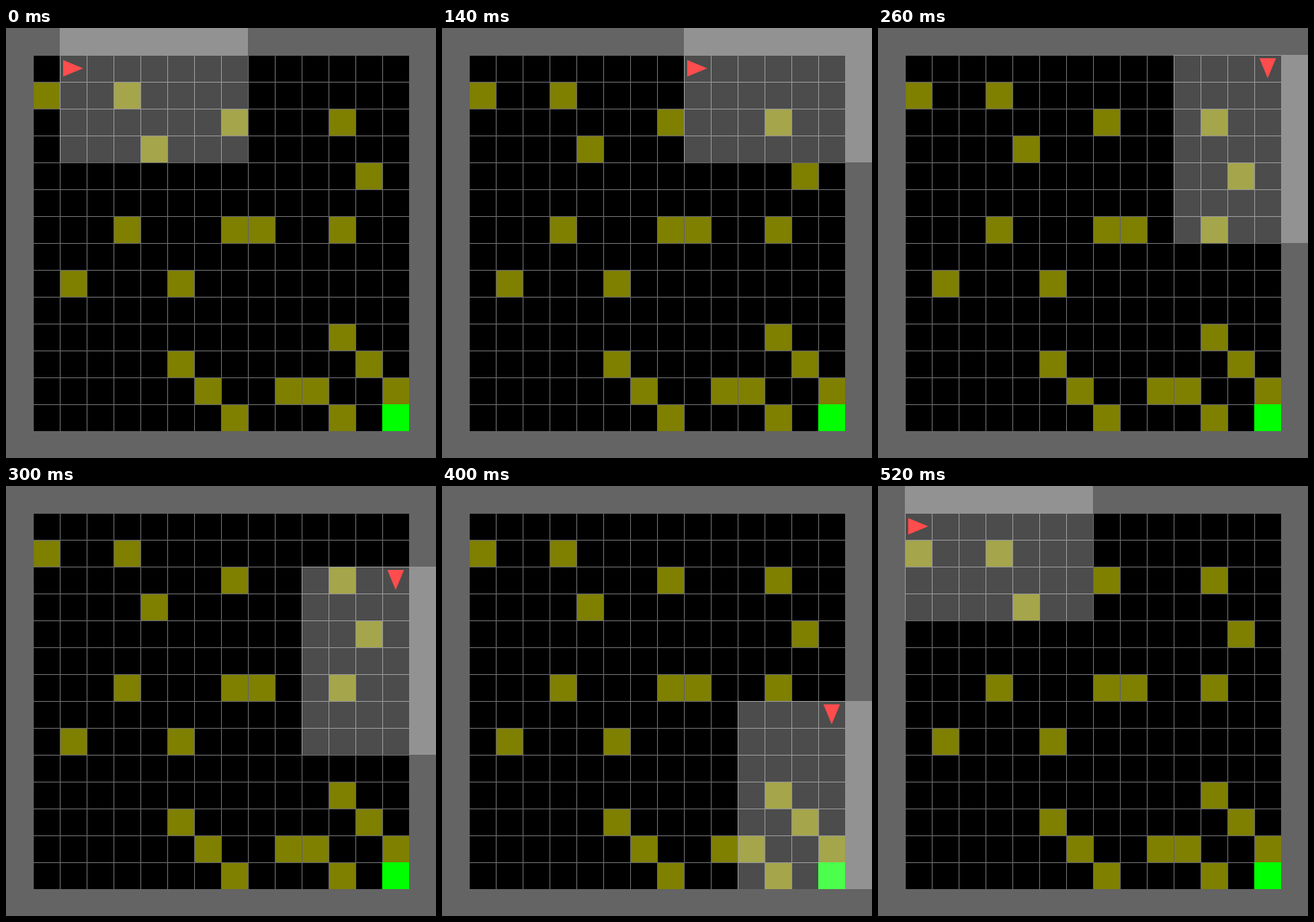
An HTML page with a canvas for the animation above (0.54 s loop, 512 px wide and 512 px high).

```html
<!DOCTYPE html>
<html>
<head>
<meta charset="utf-8">
<style>
html, body { margin: 0; height: 100%; overflow: hidden; background: #646464; }
canvas { display: block; }
</style>
</head>
<body>
<canvas id="stage" width="512" height="512"></canvas>
<script>
const ctx = document.getElementById('stage').getContext('2d');
const TILE = 32, LAST = 14, VIEW = 7, STEP_MS = 20, STEPS = 27;

function fillTile(col, row, color, inset = 0) {
  ctx.fillStyle = color;
  ctx.fillRect(col * TILE + inset, row * TILE + inset, TILE - inset, TILE - inset);
}

function drawFloor(col, row) {
  fillTile(col, row, '#7f7f00', 1);
}

// The floor tiles lie on short, evenly spaced lines.
function drawFloors() {
  for (let i = 0; i < 3; i++) {
    drawFloor(4 + 4 * i, 7);
    drawFloor(12 + i, 11 + i);
    drawFloor(6 + i, 12 + i);
  }
  for (let i = 0; i < 2; i++) {
    drawFloor(1 + 11 * i, 2 + 12 * i);
    drawFloor(4 + i, 2 + 2 * i);
    drawFloor(12 + i, 3 + 2 * i);
    drawFloor(8 + i, 3 + 4 * i);
    drawFloor(2 + 4 * i, 9);
    drawFloor(10 + i, 13);
  }
}

function drawRoom() {
  ctx.fillStyle = '#646464';
  ctx.fillRect(0, 0, 512, 512);
  for (let row = 1; row <= LAST; row++)
    for (let col = 1; col <= LAST; col++) fillTile(col, row, '#000', 1);
  drawFloors();
  fillTile(LAST, LAST, '#0f0');
}

function insideArrow(along, across) {
  const halfWidth = 0.31 * (0.87 - along) / 0.75;
  return along >= 0.12 && Math.abs(across - 0.5) <= halfWidth;
}

// Share of a 3 by 3 sample grid in one pixel that the arrow covers.
function arrowCoverage(x, y) {
  let hits = 0;
  for (let i = 0; i < 9; i++) {
    const along = (x + (i % 3 + 0.5) / 3) / TILE;
    const across = (y + (Math.floor(i / 3) + 0.5) / 3) / TILE;
    if (insideArrow(along, across)) hits++;
  }
  return hits / 9;
}

function drawAgent(col, row, facingDown) {
  ctx.fillStyle = '#f00';
  for (let along = 0; along < TILE; along++) {
    for (let across = 0; across < TILE; across++) {
      const [x, y] = facingDown ? [across, along] : [along, across];
      ctx.globalAlpha = arrowCoverage(along, across);
      ctx.fillRect(col * TILE + x, row * TILE + y, 1, 1);
    }
  }
  ctx.globalAlpha = 1;
}

function drawView(col, row, facingDown) {
  const side = (VIEW - 1) / 2;
  const left = facingDown ? col - side : col;
  const top = facingDown ? row : row - side;
  ctx.fillStyle = 'rgba(255, 255, 255, 0.298)';
  ctx.fillRect(left * TILE, top * TILE, VIEW * TILE, VIEW * TILE);
}

// The agent walks along the top wall, turns, walks down, then restarts.
function draw(time) {
  const step = (Math.floor(time / STEP_MS) + 1) % STEPS;
  const facingDown = step >= LAST;
  const col = Math.min(step + 1, LAST);
  const row = Math.max(1, step - LAST + 1);
  drawRoom();
  drawAgent(col, row, facingDown);
  drawView(col, row, facingDown);
}

const start = performance.now();
function tick() {
  draw(performance.now() - start);
  requestAnimationFrame(tick);
}
tick();
</script>
</body>
</html>
```
